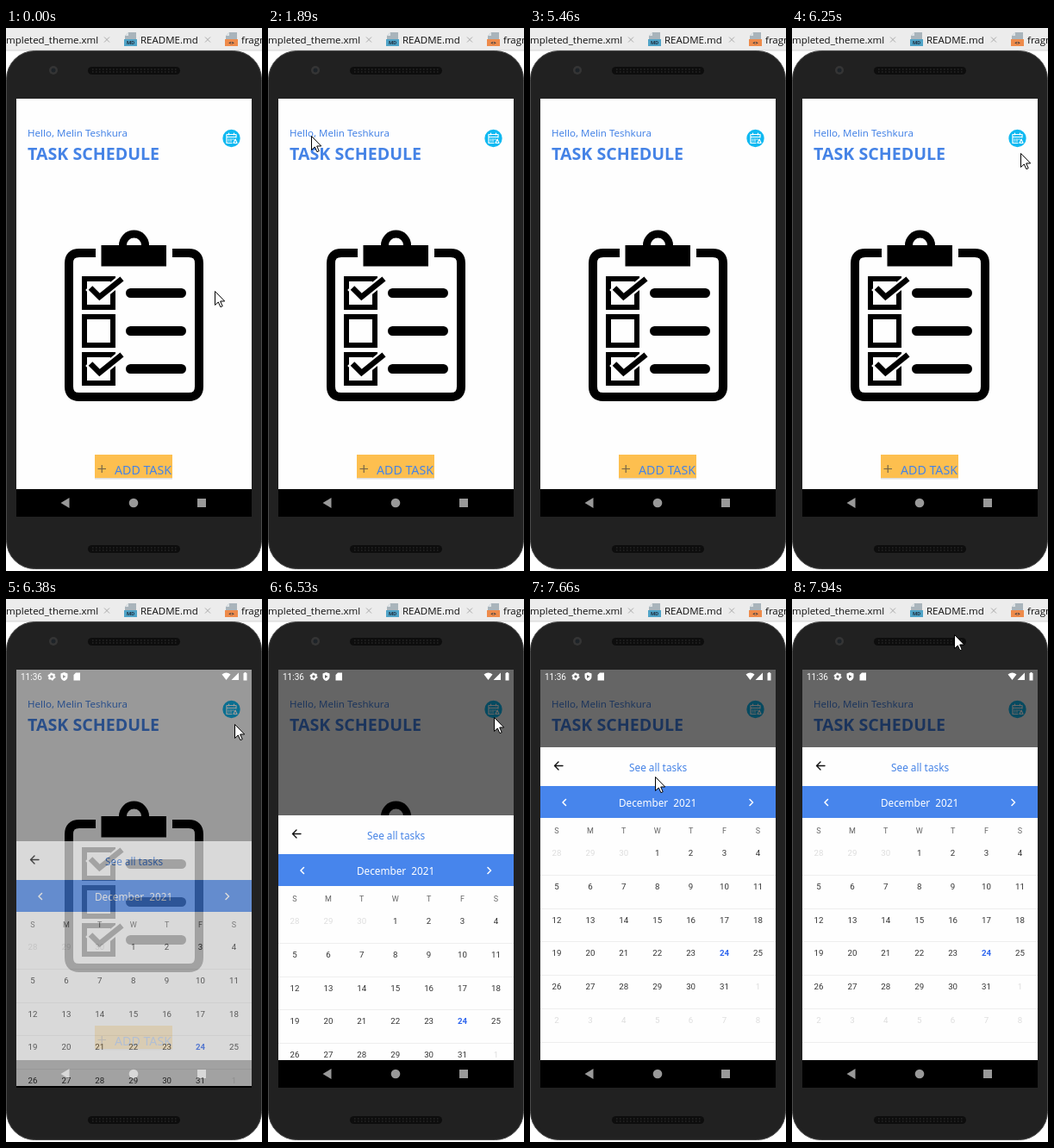
Write an HTML page that moves like this. It is 297x630 px and loops after 8000 ms.

```html
<!DOCTYPE html>
<html lang="en">
<head>
<meta charset="utf-8">
<title>Task schedule</title>
<style>
  html, body { margin: 0; width: 100%; height: 100%; overflow: hidden; background: #fff; }
  svg { display: block; width: 100vw; height: 100vh; }
  text { font-family: "Noto Sans", sans-serif; white-space: pre; }
  .tab { font: 11.5px "Open Sans", sans-serif; fill: #111; }
  .badge { font: bold 6px Roboto, sans-serif; fill: #234; text-anchor: middle; }
  .cell { font: 9.7px Roboto, sans-serif; fill: #333; text-anchor: middle; }
  .weekday { font-size: 9px; fill: #666; }
  .outside { fill: #ddd; }
  .today { font-weight: bold; fill: #2f66ee; }
  .line { fill: none; stroke-linecap: round; stroke-linejoin: round; }
</style>
</head>
<body>
<svg viewBox="0 0 297 630" xmlns="http://www.w3.org/2000/svg">
  <defs>
    <clipPath id="sheetClip"><rect id="sheetArea" x="12" y="82" width="273" height="453"/></clipPath>
    <g id="page">
      <path d="M5 0H14V9H1V4Z" fill="#a9b4bb"/>
      <path d="M5 0V4H1Z" fill="#dfe4e7"/>
    </g>
    <g id="speaker">
      <rect width="107" height="9" rx="4.5" fill="#0d0d0d"/>
      <path d="M5 3H103M5 6H103" stroke="#333" stroke-dasharray="1.5 2.5"/>
    </g>
    <g id="checkbox"><rect x="91" y="3" width="33" height="33" fill="#fefefe" stroke="#000" stroke-width="6"/></g>
    <g id="check" class="line" style="stroke-linecap:butt;stroke-linejoin:miter">
      <path d="M96 12L108.500 24L137 1" stroke="#fefefe" stroke-width="11"/>
      <path d="M98 13.500L108.500 24L134.500 3" stroke="#000" stroke-width="6.500"/>
    </g>
  </defs>

  <!-- Editor tabs -->
  <rect width="297" height="26" fill="#ececec"/>
  <path d="M0 26H297" stroke="#d4d4d4"/>
  <text class="tab" x="0" y="18">mpleted_theme.xml</text>
  <text class="tab" x="156" y="18">README.md</text>
  <text class="tab" x="273" y="18">fragment</text>
  <path d="M114 10.500l6 6m0-6l-6 6M231 10.500l6 6m0-6l-6 6" stroke="#aaa"/>
  <use href="#page" x="137" y="5"/>
  <rect x="137" y="13" width="15" height="8" fill="#4fa3c7"/>
  <text class="badge" x="144.500" y="19.200">MD</text>
  <use href="#page" x="254" y="5"/>
  <rect x="254" y="13" width="15" height="8" fill="#ee8b4b"/>
  <text class="badge" x="261.500" y="19.200">&lt;&gt;</text>

  <!-- Phone body -->
  <rect x=".5" y="26.500" width="296" height="601" rx="33" fill="#222" stroke="#4a4a4a"/>
  <rect x="3" y="29" width="291" height="596" rx="31" fill="#212121"/>
  <circle cx="55" cy="49" r="5" fill="#353535"/>
  <circle cx="55" cy="49" r="2.500" fill="#1d2328"/>
  <use href="#speaker" x="95" y="45"/>
  <use href="#speaker" x="95" y="600"/>

  <!-- Home screen -->
  <rect x="12" y="82" width="273" height="453" fill="#fefefe"/>
  <g fill="#4583e6">
    <text x="25" y="125.500" font-size="11.500">Hello, Melin Teshkura</text>
    <text x="25" y="153" font-size="19.600" font-weight="bold">TASK SCHEDULE</text>
  </g>
  <circle cx="261.500" cy="128" r="10.200" fill="#10b9f1"/>
  <g class="line" stroke="#fff" stroke-width="1.200">
    <path d="M262 133.500H256V123.500H267V127M256 126.500H267M258.500 122V124M264.500 122V124"/>
    <path d="M258 129H264M258 131H262" stroke-dasharray="1 1.500"/>
    <path d="M264 133.500L266 129L268 133.500Z"/>
  </g>
  <path class="line" style="stroke-linecap:butt" d="M104 261H85Q73 261 73 273V416Q73 428 85 428H212Q224 428 224 416V273Q224 261 212 261H193" stroke="#000" stroke-width="10"/>
  <path d="M110.500 252H131A17.500 17.500 0 0 1 166 252H186V276.500H110.500ZM140 252H157A8.500 8.500 0 0 0 140 252Z" fill-rule="evenodd"/>
  <use href="#checkbox" y="288"/><use href="#checkbox" y="332"/><use href="#checkbox" y="376"/>
  <use href="#check" y="288"/><use href="#check" y="376"/>
  <path class="line" d="M144.500 307.500H203.500M144.500 351.500H203.500M144.500 395.500H203.500" stroke="#000" stroke-width="11"/>
  <rect x="103" y="496.500" width="90" height="27" fill="#ddd"/>
  <rect x="103" y="495" width="90" height="27" fill="#fdbf4f"/>
  <path d="M106.500 511.500H116M111.250 507V516" stroke="#746447" stroke-width="1.200"/>
  <text x="126" y="518" font-size="14.200" fill="#4583e6">ADD TASK</text>

  <!-- Navigation bar -->
  <rect x="12" y="535" width="273" height="32"/>
  <g fill="#999">
    <path d="M63.500 551L73.500 545V557Z"/>
    <circle cx="148" cy="551" r="5.300"/>
    <rect x="222" y="546" width="10" height="10"/>
  </g>

  <rect id="scrim" x="12" y="82" width="273" height="453" opacity="0"/>

  <!-- Status bar: white, so it only shows over the scrim -->
  <g fill="#fefefe">
    <text x="17" y="93.500" style="font:10px Roboto,sans-serif">11:36</text>
    <circle cx="53" cy="90" r="2.700" fill="none" stroke="#fefefe" stroke-width="2"/>
    <circle cx="53" cy="90" r="3.900" fill="none" stroke="#fefefe" stroke-width="1.300" stroke-dasharray="2 2.080"/>
    <path d="M67.500 85L71.500 86.500V90Q71.500 93.500 67.500 95Q63.500 93.500 63.500 90V86.500ZM66 88V92L69.500 90Z" fill-rule="evenodd"/>
    <path d="M81 85.500H86V94.500H78.500V88ZM81 87V89M83 87V89"/>
    <path d="M250.500 87.500Q255.500 83.500 260.500 87.500L255.500 94Z"/>
    <path d="M270 85.500V94H261.500Z"/>
    <path d="M275.500 86H276.500V85H278.500V86H279.500V94.500H275.500Z"/>
  </g>

  <!-- Calendar sheet, drawn from its own top edge -->
  <g id="sheet" clip-path="url(#sheetClip)" opacity="0">
    <g id="sheetBody">
      <rect x="12" width="273" height="400" fill="#fefefe"/>
      <path class="line" d="M38 21.500H28.500M33 17L28.500 21.500L33 26" stroke="#111" stroke-width="1.400"/>
      <text x="115" y="28" font-size="11.800" fill="#4583e6">See all tasks</text>
      <rect x="12" y="45" width="273" height="37" fill="#4785ec"/>
      <path class="line" d="M41.500 60.500L38 64L41.500 67.500M255 60.500L258.500 64L255 67.500" stroke="#fff" stroke-width="1.500"/>
      <text x="103" y="69" font-size="11.750" fill="#fff">December  2021</text>
    </g>
  </g>

  <path id="cursor" d="M.5 .5V16.500L4.300 13L6.900 18.700L9.200 17.700L6.700 12H11.700Z" fill="#fff" stroke="#000"/>
</svg>
<script>
const LOOP = 8000;
const $ = id => document.getElementById(id);

function add(name, attrs, text = "") {
  const el = document.createElementNS("http://www.w3.org/2000/svg", name);
  for (const key in attrs) el.setAttribute(key, attrs[key]);
  el.textContent = text;
  $("sheetBody").append(el);
}

function buildCalendar() {
  const columnX = i => 31 + (i % 7) * 38.9;
  [..."SMTWTFS"].forEach((letter, i) =>
    add("text", { class: "cell weekday", x: columnX(i), y: 100 }, letter));
  for (let row = 1; row <= 6; row++)
    add("path", { d: `M12 ${Math.round(109 + row * 38.8) + 0.5}H285`, stroke: "#eee" });
  for (let i = 0; i < 42; i++) {
    const day = i < 3 ? 28 + i : i < 34 ? i - 2 : i - 33;
    const kind = i < 3 || i > 33 ? "outside" : day === 24 ? "today" : "";
    add("text", { class: "cell " + kind, x: columnX(i), y: 126 + Math.floor(i / 7) * 38.8 }, day);
  }
}

// Pointer positions: time, x, y (no position = hidden)
const pointer = [
  [0, 242, 305], [120, 244, 295], [420, 254, 281], [550, 270, 264],
  [700, 281, 237], [820, 285, 203], [940, 278, 171], [1090, 264, 144],
  [1210, 255, 128], [1590, 256, 126], [1740, 115, 138], [1890, 50, 125],
  [2010, 52, 128], [2160, 42, 123], [2280, 150, 150], [2400, 86, 169],
  [2550, 135, 160], [2670, 184, 148], [2830, 247, 137], [2980, 266, 126],
  [3100, 272, 122], [3380, 262, 124], [3500, 257, 126], [5460],
  [5740, 26, 452], [5860, 135, 362], [5980, 251, 262], [6130, 262, 180],
  [6250, 265, 145], [6530, 262, 137], [6680, 200, 246], [6810, 132, 346],
  [6960, 143, 311], [7210, 137, 286], [7360, 136, 285], [7510, 137, 270],
  [7660, 145, 206], [7810, 168, 110], [7940, 188, 41]
];

// Sheet states: time, top, opacity, scrim opacity, window offset
const sheetStates = [
  [0, 281, 0, 0, 30], [6380, 281, 0.64, 0.4, 30], [6530, 251, 1, 0.6, 0],
  [7510, 236, 1, 0.6, 0], [7660, 172, 1, 0.6, 0]
];

const stateAt = (states, t) => states.findLast(s => s[0] <= t);

function draw() {
  const t = performance.now() % LOOP;
  const [, x, y] = stateAt(pointer, t);
  $("cursor").setAttribute("visibility", x === undefined ? "hidden" : "visible");
  if (x !== undefined) $("cursor").setAttribute("transform", `translate(${x} ${y})`);

  const [, top, opacity, scrim, offset] = stateAt(sheetStates, t);
  $("sheet").setAttribute("opacity", opacity);
  $("sheetBody").setAttribute("transform", `translate(0 ${top})`);
  $("sheetArea").setAttribute("height", 453 + offset);
  $("scrim").setAttribute("opacity", scrim);
  requestAnimationFrame(draw);
}

buildCalendar();
draw();
</script>
</body>
</html>
```
